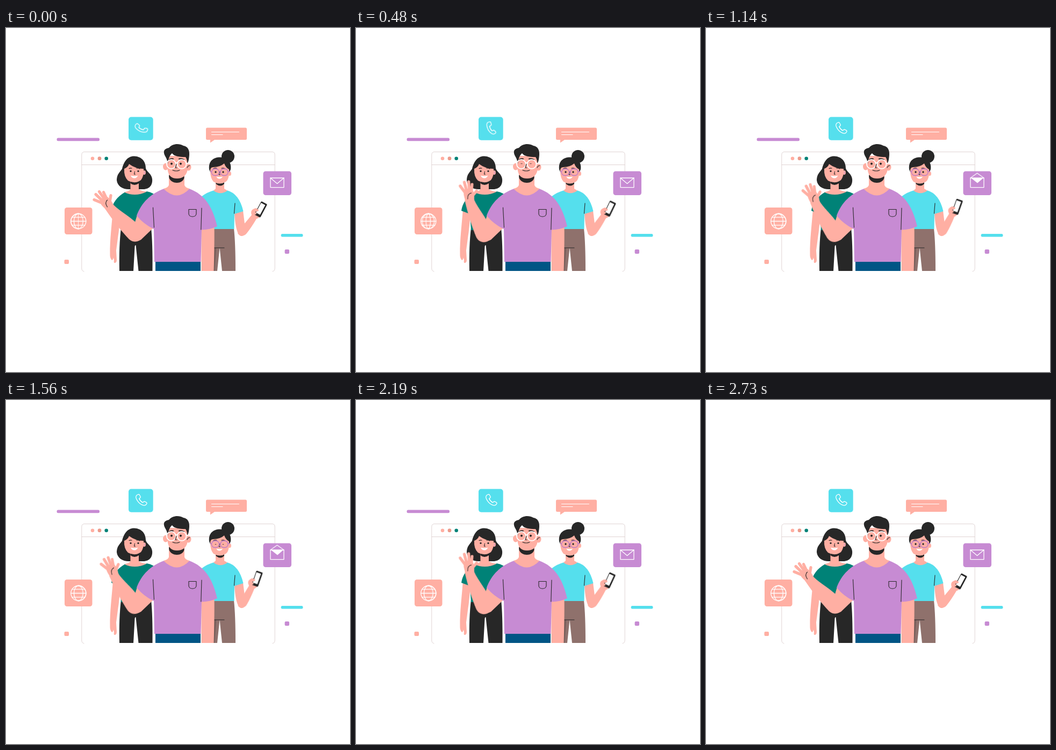
These frames come from a looping animation (640x640 px, 2760 ms). An HTML page without scripts:

```html
<!DOCTYPE html>
<html lang="en">
<head>
<meta charset="utf-8">
<title>Team greeting</title>
<style>
  html, body { margin: 0; width: 100%; height: 100%; overflow: hidden; background: #fff; }
  svg { display: block; width: 100%; height: 100%; }

  .skin { fill: #ffafa3; }
  .ink { fill: #272727; }
  .teal { fill: #008277; }
  .purple { fill: #c78bd3; }
  .cyan { fill: #55dfed; }
  .line, .thin, .icon, .finger { fill: none; stroke-linecap: round; stroke-linejoin: round; }
  .line { stroke: #272727; stroke-width: 1.1; }
  .thin { stroke: #ddd0d0; stroke-width: .9; }
  .icon { stroke: #fff; stroke-width: 1.3; }
  .finger { stroke: #ffafa3; stroke-width: 5.2; }

  .move { animation: 2760ms ease-in-out infinite; }
  .forearm { transform-origin: 240px 382px; animation-name: wave; }
  .hand { transform-origin: 193px 333px; animation-name: tilt; }
  .lift { transform-origin: 438px 379px; animation-name: lift; }
  .ring { transform-origin: 251.5px 186px; animation-name: ring; }
  .flap { transform-origin: 504.5px 279px; animation-name: flap; }
  .paper { animation-name: paper; }
  .arc { animation-name: spin; animation-timing-function: linear; }
  .bar { animation-name: bar; animation-timing-function: step-end; }
  .blink1 { transform-origin: 0 252.5px; animation-name: blink1; }
  .blink2 { transform-origin: 0 268px; animation-name: blink2; }

  @keyframes wave {
    0%, 31.9%, 64%, 98.9%, 100% { transform: none; }
    17.4%, 48.9%, 79.3% { transform: translate(-2px, 1px) rotate(21deg); }
  }
  @keyframes tilt {
    0%, 31.9%, 64%, 98.9%, 100% { transform: none; }
    17.4%, 48.9%, 79.3% { transform: rotate(10deg); }
  }
  @keyframes lift {
    0%, 100% { transform: none; }
    50% { transform: rotate(-9deg); }
  }
  @keyframes ring {
    0%, 11.6% { transform: rotate(-21deg); }
    5.8%, 17.4% { transform: rotate(15deg); }
    23% { transform: rotate(-8deg); }
    28%, 100% { transform: none; }
  }
  @keyframes flap {
    0%, 19%, 78%, 100% { transform: none; }
    29%, 68% { transform: scaleY(-.85); }
  }
  @keyframes paper {
    0%, 24%, 73%, 100% { opacity: 0; }
    29%, 68% { opacity: 1; }
  }
  @keyframes spin {
    0% { transform: scaleX(var(--from)); }
    40%, 100% { transform: scaleX(var(--to)); }
  }
  @keyframes bar {
    0% { opacity: 1; }
    98.8%, 100% { opacity: 0; }
  }
  @keyframes blink1 {
    0%, 14%, 21%, 100% { transform: none; }
    16.5%, 18.5% { transform: scaleY(.25); }
  }
  @keyframes blink2 {
    0%, 53%, 60%, 100% { transform: none; }
    55.5%, 57.5% { transform: scaleY(.25); }
  }
</style>
</head>
<body>
<svg viewBox="0 0 640 640">
  <!-- browser window -->
  <path class="thin" d="M145 453Q140.8 452 140.8 447V236Q140.8 230.5 146 230.5H495Q500.2 230.5 500.2 236V447Q500.2 452 496 453M141 254.5H500"/>
  <circle cx="161" cy="242.7" r="3.3" class="skin"/>
  <circle cx="174" cy="242.7" r="3.4" fill="#ec9b8c"/>
  <circle cx="186.7" cy="242.7" r="3.3" class="teal"/>

  <!-- loose shapes -->
  <rect class="move bar purple" x="94.5" y="204.5" width="79.5" height="5.8" rx="2.5"/>
  <rect class="cyan" x="511.7" y="383" width="40.7" height="5.5" rx="2.2"/>
  <rect class="skin" x="108.5" y="431" width="8.5" height="8" rx="2"/>
  <rect class="purple" x="518.6" y="412" width="8.4" height="8" rx="2"/>

  <!-- call -->
  <rect class="cyan" x="228" y="165.5" width="45.7" height="43.3" rx="5"/>
  <path class="icon move ring" d="M244 176.5L246.500 175.500Q248 175.500 248.700 177L250.200 180Q250.500 181.500 249 182.500L247.700 183.600Q250 188.500 254.500 190.800L256 189.400Q257.200 188.400 258.600 189L261.200 190.600Q262.600 191.800 261.700 193.200L260.200 195Q258 197 254 195.400Q245.500 192 242 182.500Q241 178.500 244 176.500Z"/>

  <!-- message -->
  <path class="skin" d="M374.500 185.500H445.500Q448 185.500 448 188V205.500Q448 208 445.500 208H388L380 213.500V208H374.500Q372 208 372 205.500V188Q372 185.500 374.500 185.500Z"/>
  <path class="icon" style="stroke-width:1.100" d="M382.500 193.500H433.500M382.500 198.500H403"/>

  <!-- mail -->
  <rect class="purple" x="478.500" y="266.500" width="52.500" height="44.500" rx="4.500"/>
  <rect class="icon" x="492" y="279" width="25" height="17.600"/>
  <path class="move paper" fill="#fff" d="M493 279H516L505 288.500Z"/>
  <path class="icon move flap" d="M492 279L504.500 289.500L517 279"/>

  <!-- web -->
  <rect class="skin" x="109" y="334" width="51.500" height="50" rx="4.500"/>
  <g class="icon" transform="translate(134.800 359.500)">
    <circle r="14"/>
    <path d="M-14 0H14M-12 -7.300H12M-12 7.300H12"/>
    <g vector-effect="non-scaling-stroke">
      <path class="move arc" style="--from:-1;--to:-.6" vector-effect="non-scaling-stroke" d="M0 -14A14 14 0 0 1 0 14"/>
      <path class="move arc" style="--from:-.6;--to:0" vector-effect="non-scaling-stroke" d="M0 -14A14 14 0 0 1 0 14"/>
      <path class="move arc" style="--from:0;--to:.6" vector-effect="non-scaling-stroke" d="M0 -14A14 14 0 0 1 0 14"/>
      <path class="move arc" style="--from:.6;--to:1" vector-effect="non-scaling-stroke" d="M0 -14A14 14 0 0 1 0 14"/>
    </g>
  </g>

  <!-- woman on the left -->
  <g>
    <path class="skin" d="M199 336L213 342C212 366 208 390 205 414L206 431Q206 437 202 437Q200 437 201 432L200 427Q199 432 197 432Q193 428 193.500 420C193 395 197 365 199 336Z"/>
    <path class="ink" d="M214 372H270Q273 400 272.500 452H246.500L241.500 404Q239.500 404 239.500 408L237 452H211Q210 405 214 372Z"/>
    <path class="ink" d="M239 238.500C226 238 219 249 216 262C212 268 206 272 206 283C207 294 217 300 228 300H255C268 300 273 291 272 281C271 271 262 268 260 261C260 248 252 239 239 238.500Z"/>
    <path class="teal" d="M222 305Q240 313 262 304Q275 306 282 316L270 376H214L212 346L196 340Q199 318 222 305Z"/>
    <path class="skin" d="M231.500 284H247V300Q251 303 262 304.500Q240 315 220 305.500Q230 303 231.500 300Z"/>
    <path class="ink" d="M231.500 285H247V289Q239 295 231.500 289Z"/>
    <ellipse class="skin" cx="257" cy="269" rx="3" ry="4"/>
    <path class="skin" d="M220 262Q227 259 229 253Q241 262 256 262Q257 275 251 283Q240 291 227 284Q219 276 220 262Z"/>
    <path class="line" d="M229 261.500Q231 260 234 261M243 261Q246 260 249 262M239.500 267L238.500 272H240.500"/>
    <circle class="ink" cx="232" cy="266.300" r="1.600"/>
    <circle class="ink" cx="246" cy="266.300" r="1.600"/>
    <path fill="#fff" d="M232 274.500Q239 276.500 245.500 274.500Q243 279.500 239 279.500Q234 279.500 232 274.500Z"/>
    <path fill="none" stroke="#c78bd3" d="M257 267Q259 269 257 272"/>
  </g>

  <!-- woman on the right -->
  <g>
    <path fill="#8f716c" d="M380 373H424Q427 400 427 452H402L397.500 409L393 452H380Z"/>
    <path fill="#755d59" d="M386 409H391L388 452H386Z"/>
    <path class="line" d="M387 409H406"/>
    <path class="skin" d="M425 342L441 340L444 364C448 382 443 387 437.500 387C430 386 426 366 425 342Z"/>
    <g class="move lift">
      <path class="skin" d="M442 366L457 348Q454 340 460 337Q466 333 470 338L475 349Q470 354 466 355Q456 372 447 383Q438 391 431 382Z"/>
      <g transform="translate(474 337.500) rotate(28)">
        <rect class="ink" x="-6.300" y="-14" width="12.600" height="28" rx="1.800"/>
        <rect x="-5.200" y="-11" width="8.800" height="20.500" fill="#fff"/>
      </g>
      <path class="finger" style="stroke-width:4" d="M460 340L468 339M460 345L464 345"/>
    </g>
    <path class="cyan" d="M387 302L411 302Q434 308 441.500 341L425 346L424.500 374H380L363 314Q375 305 387 302Z"/>
    <path class="line" d="M426 326L424.500 345"/>
    <circle class="ink" cx="413" cy="239" r="12"/>
    <path class="ink" d="M378 263C376 248 386 240 399 240.500C412 241 420 250 418 263L415 270H381Z"/>
    <path class="skin" d="M390 286H406V299L412 302.500Q399 312 386 302.500L390 299Z"/>
    <path class="ink" d="M390.500 287H406V290Q399 297 390.500 290Z"/>
    <ellipse class="skin" cx="416" cy="271" rx="3" ry="4"/>
    <path class="skin" d="M380 266Q380 259 385 259Q398 259 406 252Q409 260 415 263Q416 281 409 286Q398 293 386 286Q380 279 380 266Z"/>
    <path class="line" d="M386 261.500Q389 260 392 261M401 261Q404 260 407 261.500M397.500 267L396.500 273H398.500"/>
    <g class="move blink2 ink"><circle cx="390" cy="268" r="1.700"/><circle cx="404" cy="268" r="1.700"/></g>
    <g fill="none" stroke="#bd78c9" stroke-width="1.300">
      <rect x="382.500" y="262" width="14" height="12.500" rx="6"/>
      <rect x="399" y="262" width="14" height="12.500" rx="6"/>
      <path d="M396.500 267H399M413 267H417M380 267H382.500"/>
    </g>
    <path fill="#fff" d="M391.500 276.500Q397 278 403 276.500Q401 280.500 397 280.500Q393 280.500 391.500 276.500Z"/>
  </g>

  <!-- man -->
  <g>
    <path class="skin" d="M244 348L274 372L251 394Q241 400 231 391Z"/>
    <g class="move forearm">
      <path class="skin" d="M184 336L199 328C214 343 234 352 251 371Q259 381 251 393Q240 402 229 393C214 377 201 361 184 336Z"/>
      <g class="move hand">
        <path class="skin" d="M176 322Q178 315 186 313Q194 316 200 329L196 341Q188 341 181 333Q175 328 176 322Z"/>
        <path class="finger" d="M180 326L164 319.500M179 321L167 309.500M183 318L173.500 304.500M187 317L181.500 305.500M193 324L195 311.500"/>
        <path class="line" d="M188.500 320Q183 325 188.500 333"/>
      </g>
    </g>
    <path class="skin" d="M363.500 370H387.500Q388 400 386.500 452H363.500Z"/>
    <rect x="278" y="434" width="84" height="18" fill="#005585"/>
    <path class="purple" d="M294 299H341C370 310 384 332 393 369Q380 375 364 375.500L362.500 435H276L275 374Q256 365 243 349C252 325 269 308 294 299Z"/>
    <path class="line" d="M273.500 334L275.500 371M364 335L362.800 375M340 337.500H354V346Q353 351 347 351Q341 351 340 346Z"/>
    <path class="skin" d="M303 270H332V292Q333 297 341.500 299Q318 324 293 299Q302 297 303 292Z"/>
    <path class="ink" d="M303 274H331.500V279C328 291 308 291 303.500 279Z"/>
    <ellipse class="skin" cx="297" cy="258" rx="5" ry="6.500"/>
    <ellipse class="skin" cx="339.500" cy="259" rx="5" ry="6.500"/>
    <path class="skin" d="M300 238H338V263Q335 280 318 280Q302 280 300.500 262Z"/>
    <path class="ink" d="M301 253C300 247 299 243 297 240C292 232 292 225 303 223C309 215 322 214 330 219C341 221 342 231 340.500 241C340 246 339 249 337.500 252C337 246 336 243 334 240C323 240 313 239 309 233C303 238 302 246 301 253Z"/>
    <path class="line" style="stroke-width:2" d="M304 244.500Q307 242.500 311 243.500M322 243.500Q327 242.500 331 245"/>
    <g class="move blink1 ink"><circle cx="308" cy="252.500" r="2"/><circle cx="325" cy="252.500" r="2"/></g>
    <g fill="none" stroke="#fff" stroke-width="1.800">
      <circle cx="307.500" cy="253.300" r="8.500"/>
      <circle cx="327" cy="253.300" r="8.500"/>
      <path d="M316 251H318.500M335 251L339 253"/>
    </g>
    <path class="line" d="M317 253L315 260H318M310 264.500Q317 267.500 323 264.500M337 260Q338 256 342 256"/>
  </g>
</svg>
</body>
</html>
```
